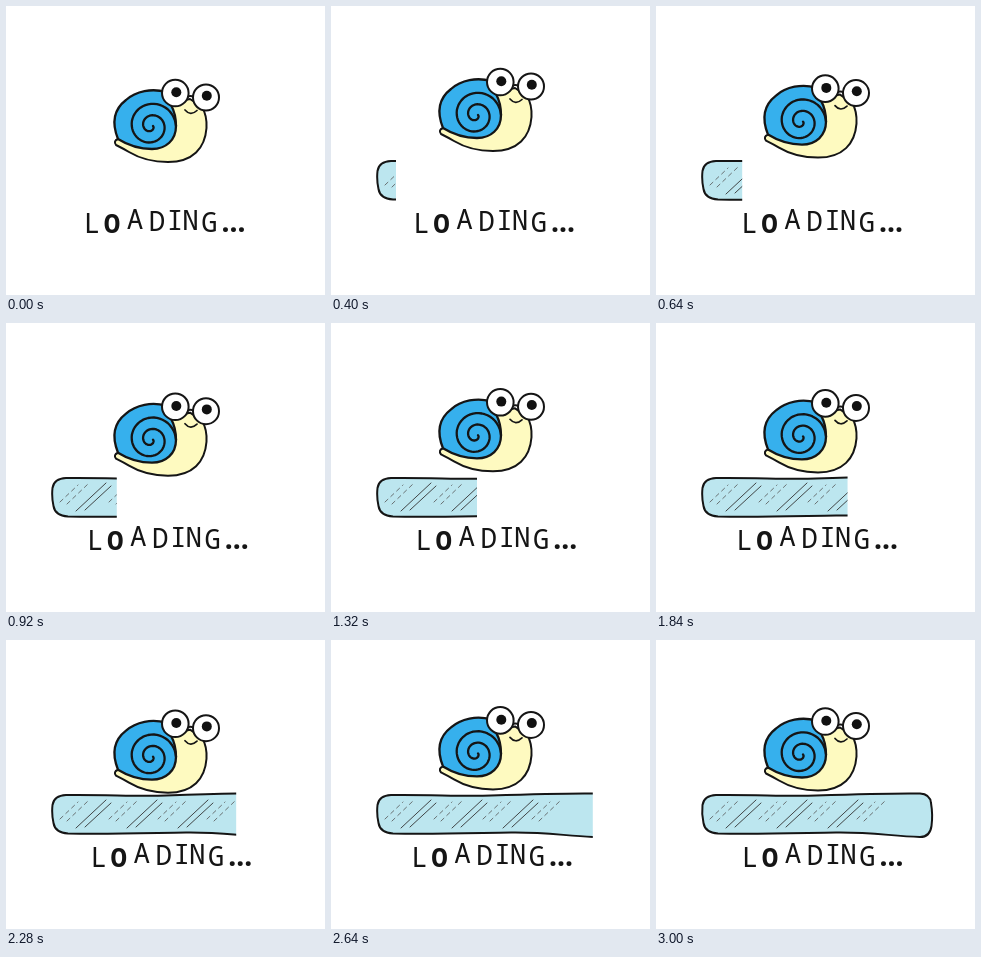
Animation of 319x289 px, one loop 3040 ms. Source, as an HTML page:

```html
<!DOCTYPE html>
<html lang="en">
<head>
<meta charset="utf-8">
<title>Loading</title>
<style>
  html, body { margin: 0; width: 100%; height: 100%; overflow: hidden; background: #fff; }
  svg { display: block; }
  text { font: 500 27.5px "Noto Sans Mono", "DejaVu Sans Mono", monospace; fill: #151515; stroke: none; text-anchor: middle; }
  .bold { font-weight: 700; }
</style>
</head>
<body>
<svg width="319" height="289" viewBox="0 0 319 289" fill="none" stroke="#151515" stroke-width="2" stroke-linecap="round" stroke-linejoin="round">
  <clipPath id="reveal"><rect id="window" x="30" y="140" width="0" height="70"/></clipPath>
  <g clip-path="url(#reveal)">
    <path fill="#bce6ef" d="M60 155C100 154.500 130 156.500 160 155.500S235 153 264 153.500Q274 154 275 163Q277 175 275.500 186Q274 197 264 197C235 196 215 192 180 192.500S100 194.500 62 193.500Q49 192.500 47.500 183Q45.500 174 46.500 165Q48 155.500 60 155Z"/>
    <path id="shine" stroke-width=".9" stroke="#333"/>
    <path id="dashes" stroke-width=".8" stroke="#555" stroke-dasharray="4 4"/>
  </g>

  <g id="snail">
    <path fill="#fefac0" d="M112 133Q107 135 110 139C114 141 118 143 123 146C133 152 145 156 162 156C187 156 199 142 200.500 122C201 113 199 106 196 101L184 93L160 98Z"/>
    <g stroke-width="2.300">
      <path fill="#36b0ed" d="M112 133C106 118 107 104 120 94C130 85 146 82 160 86L165 99Q170 108 170 120C170 134 160 143 146 143C132 143 120 138 112 133Z"/>
      <path id="spiral"/>
    </g>
    <g fill="#fff">
      <path d="M181 91Q184 89 188 91"/>
      <circle cx="169.300" cy="87" r="13.300"/>
      <circle cx="200" cy="91.500" r="13"/>
    </g>
    <g fill="#111" stroke="none">
      <circle cx="170.300" cy="86.300" r="5"/>
      <circle cx="200.800" cy="89.700" r="5"/>
    </g>
    <path stroke-width="1.700" d="M179 104Q184.500 110.500 191 104.500"/>
  </g>

  <g id="label">
    <text x="86 106 129 151 169 184.500 203.500" y="226.500 227 222.500 225 223.500 224 225.500">L<tspan class="bold">O</tspan>ADING</text>
    <text class="bold" x="219.500 227.500 235.500" y="225.500" font-size="24">...</text>
  </g>
</svg>
<script>
const $ = id => document.getElementById(id);
const LOOP = 3040, STEP = 40, PERIOD = 800;

// 0 at the start of a period, 1 halfway through, back to 0
const triangle = t => {
  const p = (t / PERIOD % 1 + 1) % 1;
  return 1 - Math.abs(2 * p - 1);
};

function spiralPath() {
  const points = [];
  for (let a = 0; a <= 4 * Math.PI + .01; a += Math.PI / 24) {
    const r = 2 + 11.5 * a / (2 * Math.PI);
    points.push((145 + r * Math.cos(a)).toFixed(1) + " " + (120 + r * Math.sin(a)).toFixed(1));
  }
  return "M" + points.join("L");
}

let shine = "", dashes = "";
for (let k = 0; k < 4; k++) {
  const solid = 70 + 51 * k, dashed = 54 + 49 * k;
  if (k < 3) shine += `M${solid} 188l30 -28M${solid + 9} 187l26 -24`;
  dashes += `M${dashed} 179l18 -17M${dashed + 7} 181l21 -20`;
}
$("shine").setAttribute("d", shine);
$("dashes").setAttribute("d", dashes);
$("spiral").setAttribute("d", spiralPath());

// The label slides in from the left, then sways
function labelShift(t) {
  if (t < 400) return 4.4 * t / 400;
  if (t < 600) return 4.4 + 3.6 * (t - 400) / 200;
  return 2 + 6 * triangle(t - 200);
}

const start = performance.now();
function draw() {
  const t = Math.floor((performance.now() - start) % LOOP / STEP) * STEP;
  $("snail").setAttribute("transform", `translate(0 ${-11 * triangle(t)})`);
  $("label").setAttribute("transform", `translate(${labelShift(t)} 0)`);
  $("window").setAttribute("width", .0878 * t);
  requestAnimationFrame(draw);
}
draw();
</script>
</body>
</html>
```
